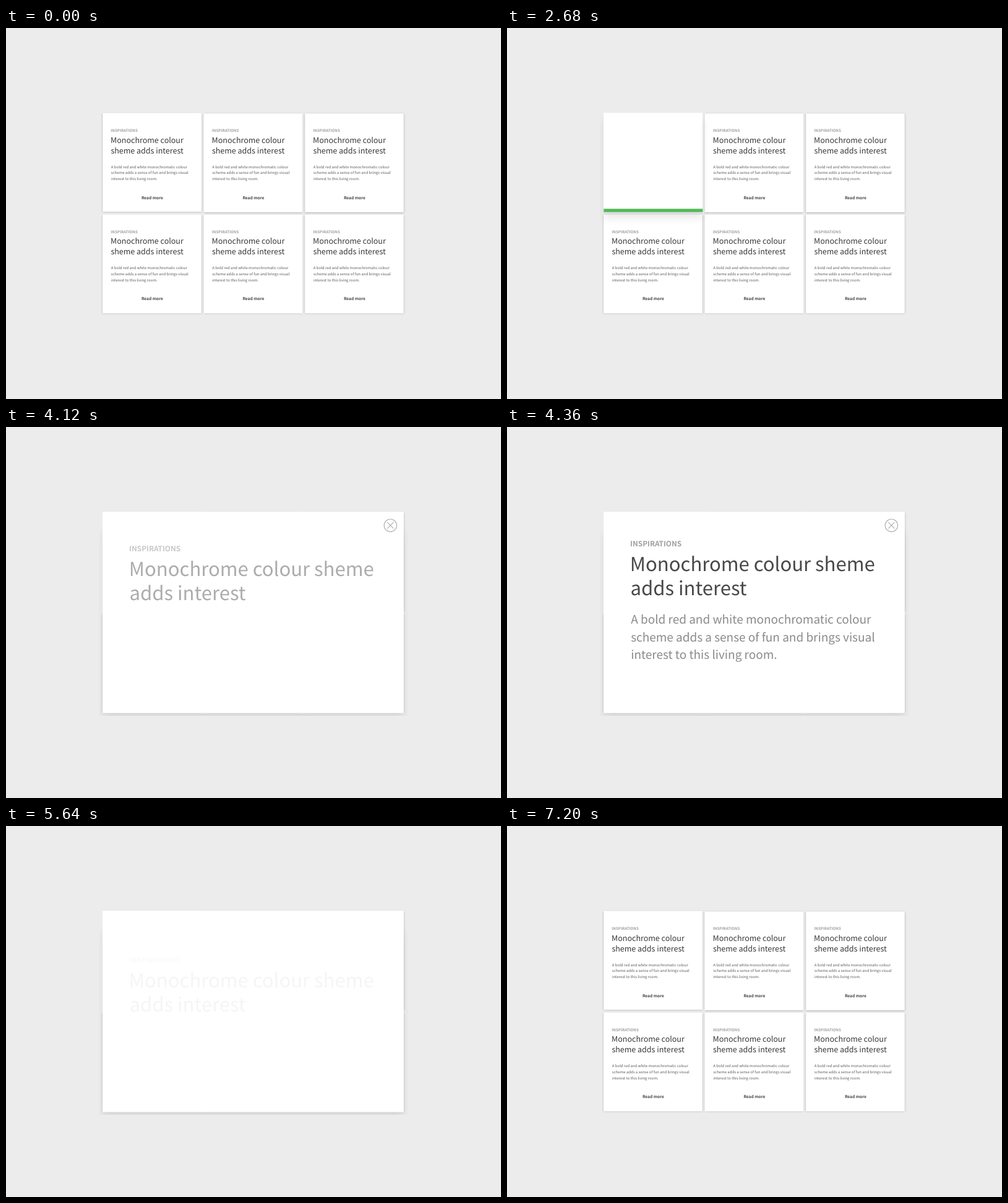
These frames come from a looping animation (800 px wide and 600 px high, 7760 ms). An HTML page with a canvas:

```html
<!DOCTYPE html>
<html lang="en">
<head>
<meta charset="utf-8">
<title>Card expand</title>
<style>
html, body { margin: 0; width: 100%; height: 100%; overflow: hidden; background: #ececec; }
canvas { display: block; width: 800px; height: 600px; }
</style>
</head>
<body>
<canvas id="stage" width="800" height="600"></canvas>
<script>
const ctx = document.getElementById('stage').getContext('2d');
const LOOP = 7760, STEP = 40;
const FONT = '"Noto Sans CJK JP", "Noto Sans CJK SC", "Noto Sans CJK", "Noto Sans", sans-serif';
const BODY = [
  'A bold red and white monochromatic colour',
  'scheme adds a sense of fun and brings visual',
  'interest to this living room.'
];
const CARD = 160, PITCH = 163.5;
const OPEN = { x: 156.3, y: 137.4, w: 486.2, h: 325 };

const clamp = v => Math.max(0, Math.min(1, v));
const ramp = (t, from, to) => clamp((t - from) / (to - from));
const mix = (a, b, k) => a + (b - a) * k;
const easeOut = (k, n) => 1 - Math.pow(1 - k, n);
const easeInOut = (k, n) =>
  k < 0.5 ? 0.5 * Math.pow(2 * k, n) : 1 - 0.5 * Math.pow(2 - 2 * k, n);

function text(str, x, y, size, color, alpha = 1, weight = 400, align = 'left') {
  if (alpha <= 0) return;
  ctx.globalAlpha = alpha;
  ctx.font = `${weight} ${size}px ${FONT}`;
  ctx.textAlign = align;
  ctx.fillStyle = color;
  ctx.fillText(str, x, y);
  ctx.globalAlpha = 1;
}

function panel(x, y, w, h, shadow, dy, blur) {
  ctx.save();
  ctx.shadowColor = `rgba(0,0,0,${shadow})`;
  ctx.shadowOffsetY = dy;
  ctx.shadowBlur = blur;
  ctx.fillStyle = '#fff';
  ctx.fillRect(x, y, w, h);
  ctx.restore();
}

// alphas: label, title, body, link
function cardText(x, y, alphas = [1, 1, 1, 1]) {
  const [label, title, body, link] = alphas;
  text('INSPIRATIONS', x + 13.3, y + 30, 6.2, '#a0a0a0', label, 700);
  text('Monochrome colour', x + 13.1, y + 47.4, 12.5, '#383838', title);
  text('sheme adds interest', x + 13.4, y + 64.4, 12.5, '#383838', title);
  BODY.forEach((s, i) => text(s, x + 13.8, y + 88.5 + i * 9.6, 6, '#5a5a5a', body));
  text('Read more', x + 80.4, y + 138.3, 6.6, '#444', link, 700, 'center');
}

function closeIcon(alpha, scale) {
  if (alpha <= 0) return;
  ctx.save();
  ctx.translate(621.3, 159.2);
  ctx.scale(scale, scale);
  ctx.globalAlpha = alpha;
  ctx.strokeStyle = '#b0b0b0';
  ctx.lineWidth = 1.2;
  ctx.beginPath();
  ctx.arc(0, 0, 10.2, 0, Math.PI * 2);
  ctx.moveTo(-5, -5); ctx.lineTo(5, 5);
  ctx.moveTo(5, -5); ctx.lineTo(-5, 5);
  ctx.stroke();
  ctx.restore();
}

function article(t) {
  if (t < 3900 || t > 6400) return;
  const headIn = ramp(t, 3920, 4400), headOut = ramp(t, 5220, 5640);
  const bodyIn = ramp(t, 4120, 4480), bodyOut = ramp(t, 5210, 5540);
  const headY = 28 * (1 - easeOut(headIn, 2.3)) + 28 * headOut * headOut;
  const bodyY = 28 * (1 - easeOut(bodyIn, 2.3)) + 36 * bodyOut * bodyOut;
  const leave = mix(1, 0.05, headOut) * (1 - ramp(t, 6300, 6380));
  const bodyA = bodyIn * (1 - bodyOut);

  text('INSPIRATIONS', 199.1, 192.8 + headY, 11.8, '#a0a0a0', ramp(t, 3900, 4280) * leave, 700);
  text('Monochrome colour sheme', 198.8, 232.8 + headY, 31.05, '#383838', headIn * leave);
  text('adds interest', 199.6, 272.1 + headY, 31.05, '#383838', headIn * leave);
  BODY.forEach((s, i) => text(s, 200.2, 316.2 + i * 28.2 + bodyY, 18.97, '#505050', bodyA));

  const press = ramp(t, 4840, 5160);
  const iconA = ramp(t, 3900, 4120) * (1 - ramp(t, 5220, 5480));
  closeIcon(iconA, 1 + 0.5 * Math.sin(Math.PI * press));
}

function activeCard(t) {
  const grow = t < 5000
    ? easeInOut(ramp(t, 2956, 3760), 3.4)
    : 1 - easeInOut(ramp(t, 6280, 7000), 3);
  const lift = easeInOut(ramp(t, 330, 680), 2) * (1 - ramp(t, 6560, 7040));
  const { x, y } = OPEN;
  const w = mix(CARD - 0.3, OPEN.w, grow), h = mix(CARD - 0.3, OPEN.h, grow);

  ctx.save();
  ctx.beginPath();
  ctx.rect(150, 100, 500, 367);
  ctx.clip();
  if (lift > 0) panel(x, y, w, h, 0.075 * lift, 12 + 22 * grow, 12);
  panel(x, y, w, h, 0.24 * (1 - lift), 1, 3);
  ctx.restore();

  if (t < 2640) {
    const out = ramp(t, 2300, 2600);
    cardText(156, y + 0.9 - 20 * easeInOut(out, 2), Array(4).fill(1 - out));
  } else if (t > 6600) {
    const alphas = [0, 1, 2, 3].map(i => ramp(t, 6700 + i * 70, 6920 + i * 90));
    cardText(156, y + 0.9, alphas);
  }

  const fill = Math.pow(ramp(t, 1015, 2295), 2.3);
  const barA = 1 - ramp(t, 2600, 2880);
  if (fill > 0 && barA > 0) {
    ctx.globalAlpha = barA;
    ctx.fillStyle = '#0a9f10';
    ctx.fillRect(x, 292.4, CARD * fill, 5.2);
    ctx.globalAlpha = 1;
  }
}

function draw(t) {
  ctx.fillStyle = '#ececec';
  ctx.fillRect(0, 0, 800, 600);
  for (let i = 1; i < 6; i++) {
    const x = 156.2 + (i % 3) * PITCH, y = 138.3 + Math.floor(i / 3) * PITCH;
    panel(x, y, CARD - 0.5, CARD - 0.4, 0.24, 1, 3);
    cardText(x - 0.2, y);
  }
  activeCard(t);
  article(t);
}

function tick() {
  const t = performance.now() % LOOP;
  ctx.textRendering = 'geometricPrecision';
  draw(Math.floor(t / STEP) * STEP);
  requestAnimationFrame(tick);
}
tick();
</script>
</body>
</html>
```
